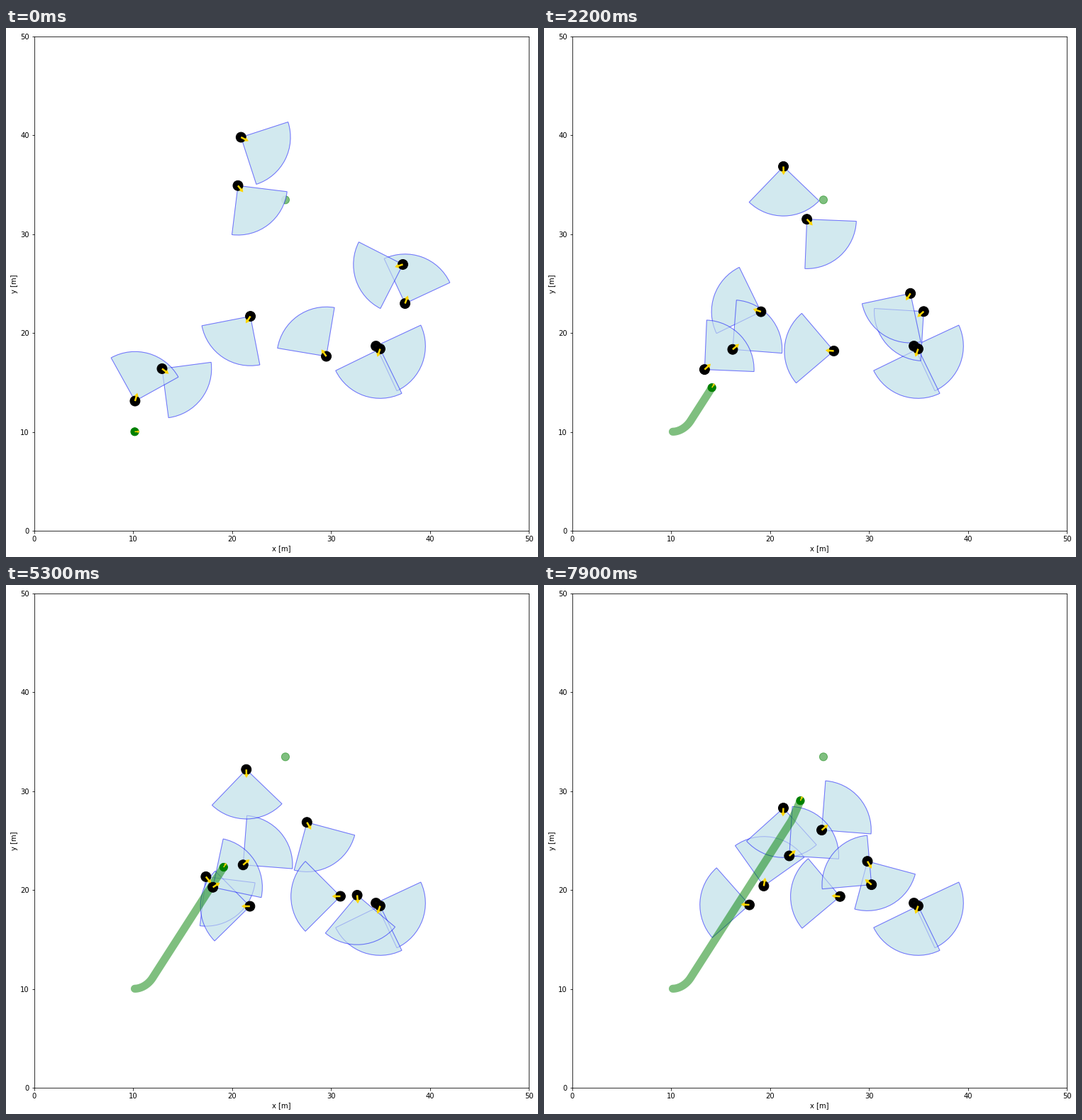
Write a matplotlib script that moves like this. It is 750 by 746 pixels and loops after 8000 ms.

```python
import numpy as np
import matplotlib.pyplot as plt
from matplotlib.animation import FuncAnimation
from matplotlib.patches import Circle, Polygon, Wedge

W, H, DPI = 750, 746, 72
FRAMES, STEP_MS, SUB = 80, 100, 10
LEFT, BOTTOM, SIDE = 39.8, 36.8, 697.4   # plot area in pixels
DT = STEP_MS / 1000 / SUB
REACH, FOV = 5, 90                       # field of view: metres, degrees
FACE = (206 / 255, 231 / 255, 238 / 255, 0.9)
ARROW = np.array([(0, .09), (.48, .09), (.48, .23), (.85, 0),
                  (.48, -.23), (.48, -.09), (0, -.09)])

fig = plt.figure(figsize=(W / DPI, H / DPI), dpi=DPI, facecolor="white")
ax = fig.add_axes([LEFT / W, BOTTOM / H, SIDE / W, SIDE / H])
ax.set(xlim=(0, 50), ylim=(0, 50))
ax.set_xlabel("x [m]", labelpad=3)
ax.set_ylabel("y [m]", labelpad=3)


def drive(x, y, deg, legs, rate):
    """Turn to each leg's heading at a capped rate, slower while off course."""
    pos, a, rate = np.array([x, y]), np.radians(deg), rate * DT
    goal, speed, legs = a, 0, list(legs)
    track = []
    for i in range(FRAMES * SUB):
        track.append((*pos, np.degrees(a)))
        if legs and i * DT >= legs[0][0] - 1e-9:
            _, heading, *new = legs.pop(0)
            goal = np.radians(heading)
            speed = new[0] if new else speed
        turn = np.clip(goal - a, -rate, rate)
        mid = a + turn / 2
        v = speed * max(0, np.cos(goal - mid))
        pos = pos + v * DT * np.array([np.cos(mid), np.sin(mid)])
        a += turn
    return np.array(track)


class Robot:
    """Start pose and legs of (seconds, heading[, metres per second])."""

    def __init__(self, x, y, deg, *legs, rate=1.5, color="black",
                 radius=0.5, arrow=1.0, view=True):
        self.track = drive(x, y, deg, legs, rate)
        self.size = arrow
        self.views = []
        if view:
            self.views = [
                self.add_view(fc=FACE, ec=(0, 0, 1, 0.4), zorder=1),
                self.add_view(fc="none", ec=(0, 0, 1, 0.2), zorder=1.5)]
        self.body = ax.add_patch(Circle((x, y), radius, color=color, lw=1,
                                        zorder=3))
        self.arrow = ax.add_patch(Polygon(ARROW, fc="gold", ec="none",
                                          zorder=3))

    def add_view(self, **style):
        return ax.add_patch(Wedge((0, 0), REACH, 0, FOV, lw=1, **style))

    def move(self, frame):
        x, y, deg = self.track[frame * SUB]
        c, s = np.cos(np.radians(deg)), np.sin(np.radians(deg))
        self.body.center = x, y
        self.arrow.set_xy(self.size * ARROW @ np.array([(c, s), (-s, c)])
                          + (x, y))
        for view in self.views:
            view.set_center((x, y))
            view.set_theta1(deg - FOV / 2)
            view.set_theta2(deg + FOV / 2)


ax.add_patch(Circle((25.39, 33.47), 0.4, color="green", alpha=0.5, lw=1,
                    zorder=0.5))

leader = Robot(10.16, 10.03, 0, (0, 57.3, 3), (7.1, 66), rate=1.15,
               color="green", radius=0.4, arrow=0.6, view=False)
leader.body.set_zorder(4)
leader.arrow.set_zorder(4)

robots = [
    leader,
    Robot(21.85, 21.7, 236, (0, 161, 1.5), (2.6, 180), (3.45, 270, .75),
          (4.5, 308, 1), (5.85, 330, 1.5), (6.6, 363), (7, 441, .5)),
    Robot(12.92, 16.4, -37.5, (0, 40.6, 2.08)),
    Robot(29.52, 17.65, 125.5, (0, 175.4, 1.5), (3.4, 179.5), (6.5, 176.5)),
    Robot(20.9, 39.8, -27, (0, -88.9, 1.5), (6.3, -93)),
    Robot(10.19, 13.13, 74, (0, 42.6, 2.08), (4.4, 33, 1.75), (6, 41.5, 2)),
    Robot(34.54, 18.69, -20),
    Robot(34.96, 18.4, 251),
    Robot(20.59, 34.91, -52, (0, -47.3, 2.1), (3.6, -52.5, 1.85),
          (5, -60, 1.75)),
    Robot(37.48, 22.99, 70, (0, 221.5, 2.08), (3.4, 217, 1.8),
          (4.3, 180, 1.5), (5.8, 174), (6.6, 187), (7.6, 175)),
    Robot(37.26, 26.94, 198, (0, 223.5, 2), (1.8, 237, 1.75),
          (3.1, 250, 1.55), (4.4, 275, 1.5), (5.4, 221, 0), (6.1, 140, 1.9)),
]

trail, = ax.plot([], [], color="green", alpha=0.5, lw=11.2, zorder=2,
                 solid_capstyle="round", solid_joinstyle="round")


def draw(frame):
    for robot in robots:
        robot.move(frame)
    path = leader.track[:frame * SUB + 2, :2]
    trail.set_data(path[:, 0], path[:, 1])
    return []


anim = FuncAnimation(fig, draw, frames=FRAMES, interval=STEP_MS,
                     repeat=True, repeat_delay=0, blit=False)
plt.show()
```
